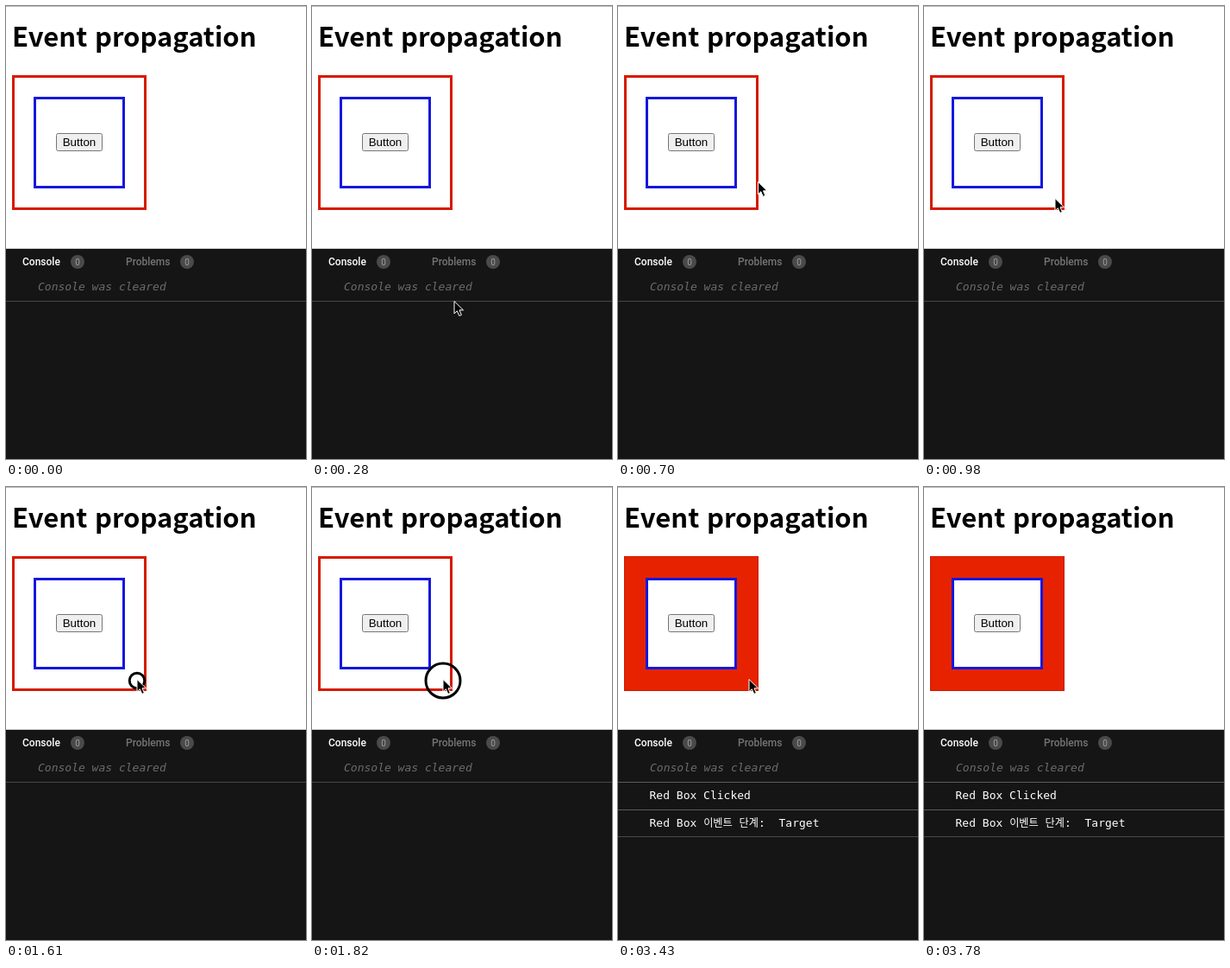
Write an HTML page that moves like this. It is 348 px wide and 524 px high and loops after 4200 ms.

```html
<!DOCTYPE html>
<html lang="ko">
<head>
<meta charset="utf-8">
<style>
  html, body { margin: 0; width: 348px; height: 524px; overflow: hidden; background: #fff; }
  svg { display: block; }
  text { white-space: pre; }
  .title { font: 700 31px "Noto Sans CJK KR", "Noto Sans", sans-serif; }
  .button { font: 13.33px "Liberation Sans", Arial, sans-serif; }
  .tab { font: 500 12px Roboto, sans-serif; }
  .count { font: 10px Roboto, sans-serif; fill: #a0a0a0; text-anchor: middle; }
  .log { font: 13px "DejaVu Sans Mono", monospace; fill: #fff; }
  .hangul { font: 12.2px "Noto Sans CJK KR", sans-serif; }
</style>
</head>
<body>
<svg width="348" height="524" viewBox="0 0 348 524">
  <rect width="348" height="1" fill="#bbb"/>
  <text class="title" x="7" y="47">Event propagation</text>

  <rect x="8.5" y="81.5" width="153" height="153" fill="#fff" stroke="#d61a00" stroke-width="3"/>
  <rect class="clicked" x="7.5" y="80.5" width="155" height="155" fill="#e72200" stroke="#c81c00"/>
  <rect x="33.5" y="106.5" width="103" height="103" fill="#fff" stroke="#1518dc" stroke-width="3"/>
  <rect x="58.5" y="147.5" width="53" height="20" rx="2" fill="#efefef" stroke="#767676"/>
  <text class="button" x="65.7" y="162">Button</text>

  <rect y="280" width="348" height="1" fill="#ccc"/>
  <rect y="281" width="348" height="243" fill="#151515"/>
  <text class="tab" x="19" y="300" fill="#fff">Console</text>
  <circle cx="83" cy="296" r="8" fill="#4a4a4a"/>
  <text class="count" x="83" y="299.5">0</text>
  <text class="tab" x="139" y="300" fill="#757575">Problems</text>
  <circle cx="210" cy="296" r="8" fill="#4a4a4a"/>
  <text class="count" x="210" y="299.5">0</text>

  <text class="log" x="37" y="329" font-style="italic" style="font-style:italic;fill:#6c6c6c">Console was cleared</text>
  <rect y="341" width="348" height="1" fill="#484848"/>
  <g class="clicked">
    <rect y="341" width="348" height="1" fill="#5a5a5a"/>
    <text class="log" x="36.5" y="361">Red Box Clicked</text>
    <rect y="373" width="348" height="1" fill="#5a5a5a"/>
    <text class="log" x="36.5" y="393">Red Box <tspan class="hangul">이벤트</tspan> <tspan class="hangul">단계</tspan>:  Target</text>
    <rect y="404" width="348" height="1" fill="#484848"/>
  </g>

  <circle id="ring" cx="152" cy="224" fill="none" stroke="#000" stroke-width="3"/>
  <path id="cursor" d="M.5 .5V14.8L3.8 11.7L6.3 17.4L8.9 16.3L6.5 10.8H11Z" stroke="#fff"/>
</svg>
<script>
  const LOOP = 4200, STEP = 70, PRESS = 1610, RELEASE = 1890, LEAVE = 3780;

  // time, x, y of the pointer tip
  const path = [
    [70, 170, 508], [210, 168, 388], [350, 161, 294], [490, 154.5, 244.5],
    [560, 157, 228], [630, 160, 212], [700, 162, 203], [770, 162, 203],
    [980, 151.5, 222], [3430, 151.5, 222], [3500, 156, 250],
    [3570, 168, 318], [3640, 181, 396], [3710, 190, 467]
  ];
  const ring = document.getElementById('ring');
  const cursor = document.getElementById('cursor');
  const clicked = document.querySelectorAll('.clicked');

  const show = (el, on) => el.setAttribute('visibility', on ? 'visible' : 'hidden');

  function pointAt(t) {
    const i = path.findIndex(p => p[0] >= t);
    if (i < 0) return path[path.length - 1].slice(1);
    if (i === 0) return path[0].slice(1);
    const [t0, x0, y0] = path[i - 1], [t1, x1, y1] = path[i];
    const k = (t - t0) / (t1 - t0);
    return [x0 + (x1 - x0) * k, y0 + (y1 - y0) * k];
  }

  function draw(now) {
    const t = Math.floor(now % LOOP / STEP) * STEP;
    show(cursor, t >= path[0][0] && t < LEAVE);
    cursor.setAttribute('transform', `translate(${pointAt(t)})`);

    const k = Math.min(1, Math.max(0, (t - PRESS + STEP) / (RELEASE - PRESS)));
    show(ring, t >= PRESS && t < RELEASE);
    ring.setAttribute('r', 20 * (1 - (1 - k) ** 2));

    clicked.forEach(el => show(el, t >= RELEASE));
    requestAnimationFrame(draw);
  }
  draw(performance.now());
</script>
</body>
</html>
```
